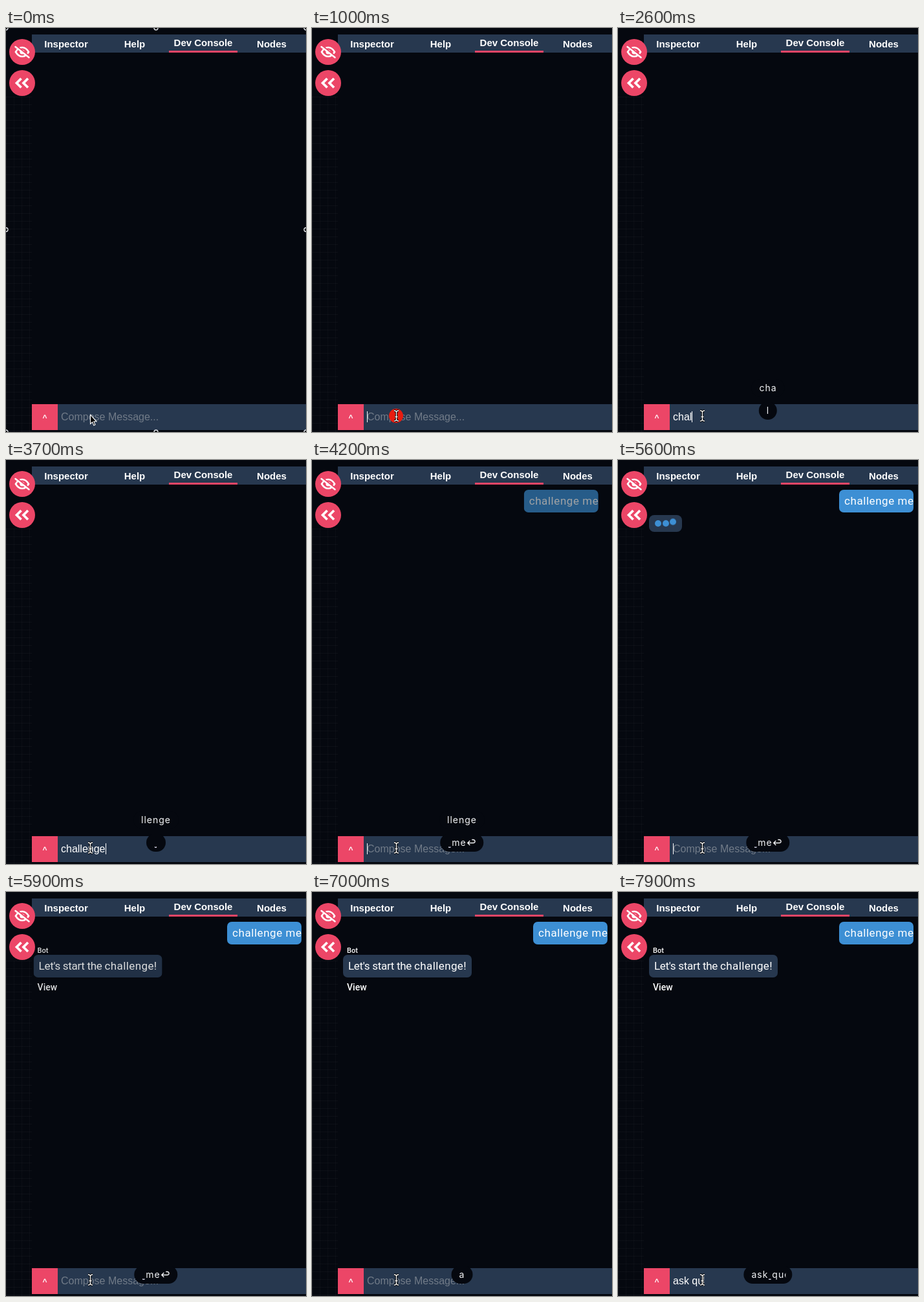
An HTML page for the animation above (8000 ms loop, 464 by 624 pixels).

```html
<!DOCTYPE html>
<html lang="en">
<head>
<meta charset="utf-8">
<title>Dev console chat</title>
<style>
  :root { --bg: #05080f; --bar: #27384f; --pink: #ec4667; --blue: #3d8fd4; }
  html, body { margin: 0; width: 100%; height: 100%; overflow: hidden; background: var(--bg); }
  #stage { position: relative; width: 464px; height: 624px; overflow: hidden; color: #fff; background: var(--bg); }
  #stage > * { position: absolute; white-space: pre; }
  .loop { animation: 8s linear infinite; }

  .grid {
    left: 0; top: 106px; width: 40px; height: 518px;
    background:
      repeating-linear-gradient(#ffffff08 0 1px, transparent 1px 12px),
      repeating-linear-gradient(90deg, #ffffff06 0 1px, transparent 1px 12px);
  }
  .tabs { left: 40px; top: 10px; width: 424px; height: 28px; background: var(--bar); display: flex; font: bold 15px/30px "Liberation Sans", Arial, sans-serif; }
  .tabs b { flex: 1; text-align: center; box-sizing: border-box; height: 28px; }
  .tabs .on { border-bottom: 3px solid var(--pink); line-height: 26px; }
  .icons { left: 0; top: 0; }

  .bubble { height: 35px; padding: 0 8px; border-radius: 7px; font: 17px/35px Roboto, sans-serif; box-sizing: border-box; }
  .user { left: 342px; top: 46px; width: 115px; background: var(--blue); letter-spacing: .56px; animation-name: user; }
  .bot { left: 48px; top: 84px; width: 199px; height: 80px; animation-name: bot; font: 500 14px/16px Roboto, sans-serif; }
  .bot > * { position: absolute; }
  .bot small { left: 6px; top: 0; font-size: 11px; line-height: 13px; }
  .bot .bubble { left: 0; top: 13px; width: 199px; background: var(--bar); letter-spacing: -.3px; }
  .bot .bubble span { letter-spacing: .4px; }
  .bot b { left: 6px; top: 55px; font-weight: 500; }
  .wait { left: 48px; top: 85px; width: 51px; height: 26px; border-radius: 8px; background: var(--bar); animation-name: wait; }
  .wait i { position: absolute; top: 8px; width: 10px; height: 10px; border-radius: 50%; background: var(--blue); animation-name: hop; }
  .wait i:nth-child(1) { left: 9px; }
  .wait i:nth-child(2) { left: 20.5px; animation-delay: .2s; }
  .wait i:nth-child(3) { left: 32px; animation-delay: .4s; }

  .field { left: 40px; top: 581px; width: 424px; height: 40px; background: var(--bar); font: 16px/40px "Liberation Sans", Arial, sans-serif; }
  .field > * { position: absolute; left: 45px; top: -.5px; }
  .field .send { left: 0; top: 0; width: 40px; height: 40px; background: var(--pink); text-align: center; font: bold 12px/42px "Liberation Sans", Arial, sans-serif; }
  #hint { color: #717b88; }
  #caret { display: inline-block; width: 1px; height: 17px; background: #fff; vertical-align: -3px; }

  .keys { left: 232px; height: 28px; border-radius: 14px; background: var(--bg); transform: translateX(-50%); font: 14px/28px Inter, sans-serif; letter-spacing: 1px; color: #f4f5f7; }
  .keys div { position: absolute; left: 12px; right: 10px; top: 0; height: 28px; overflow: hidden; }
  .keys span { display: inline-block; }
  .keys i { display: inline-block; width: 3px; height: 2px; margin: 0 2px 0 1px; border: solid #ccd; border-width: 0 1px 1px; box-sizing: border-box; vertical-align: -3px; }
  .keys svg { width: 14px; height: 12px; margin-left: 1px; vertical-align: -1px; }
  #now { top: 577px; }
  #past { top: 542px; }

  .dot { left: 119px; top: 588px; width: 22px; height: 22px; border-radius: 50%; background: #e81d10; animation-name: click; }
  .arrow { left: 129px; top: 596px; animation-name: arrow; }
  .beam { left: 124px; top: 589px; animation-name: beam; }
  .handles { left: 0; top: 0; animation-name: handles; }

  @keyframes user {
    0%, 50.25% { opacity: 0; transform: translateX(-38px); animation-timing-function: ease; }
    56.5%, 100% { opacity: 1; transform: none; }
  }
  @keyframes wait {
    0%, 55% { opacity: 0; transform: translateX(-38px); animation-timing-function: ease; }
    60.5% { opacity: 1; transform: none; animation-timing-function: step-end; }
    70.2%, 100% { opacity: 0; transform: none; }
  }
  @keyframes bot {
    0%, 70.25% { opacity: 0; transform: translateX(-38px); animation-timing-function: ease; }
    76.5%, 100% { opacity: 1; transform: none; }
  }
  @keyframes hop {
    0%, 58.75% { transform: none; animation-timing-function: ease; }
    63.6% { transform: translateY(-5px); animation-timing-function: ease; }
    68.5%, 100% { transform: none; }
  }
  @keyframes click {
    0% { opacity: 0; animation-timing-function: step-end; }
    10.9%, 13.5% { opacity: 1; transform: none; }
    17.3%, 100% { opacity: 0; transform: scale(1.9); }
  }
  @keyframes arrow { 0% { opacity: 1; animation-timing-function: step-end; } 8.7%, 100% { opacity: 0; } }
  @keyframes beam { 0% { opacity: 0; animation-timing-function: step-end; } 8.7%, 100% { opacity: 1; } }
  @keyframes handles {
    0% { opacity: 1; animation-timing-function: step-end; }
    1.2% { opacity: .4; animation-timing-function: step-end; }
    2.4%, 100% { opacity: 0; }
  }
</style>
</head>
<body>
<div id="stage">
  <div class="grid"></div>
  <div class="tabs"><b>Inspector</b><b>Help</b><b class="on">Dev Console</b><b>Nodes</b></div>

  <div class="bubble user loop">challenge me</div>
  <div class="wait loop"><i class="loop"></i><i class="loop"></i><i class="loop"></i></div>
  <div class="bot loop"><small>Bot</small><div class="bubble">Let's start the <span>challenge!</span></div><b>View</b></div>

  <svg class="icons" width="50" height="110" fill="none" stroke="#fff">
    <g fill="#ec4667" stroke="none"><circle cx="25" cy="37" r="20"/><circle cx="25" cy="85" r="20"/></g>
    <path d="M15 37Q19 30 25 30T35 37Q31 44 25 44T15 37Z" stroke-width="2.6"/>
    <circle cx="25" cy="37" r="3.6" fill="#fff" stroke="none"/>
    <path d="M15 27.5L37 44.5" stroke="#ec4667" stroke-width="3"/>
    <path d="M14.5 29L35.5 45.5" stroke-width="2.5" stroke-linecap="round"/>
    <path d="M23.5 78L16.5 85L23.5 92M34 78L27 85L34 92" stroke-width="3.8"/>
  </svg>

  <div class="field"><div class="send">^</div><span id="hint">Compose Message...</span><div><span id="typed"></span><span id="caret"></span></div></div>

  <div class="keys" id="past"><div><span></span></div></div>
  <div class="keys" id="now"><div><span></span></div></div>

  <div class="dot loop"></div>
  <svg class="arrow loop" width="14" height="20"><path d="M1.5 1.5V15.5L4.6 12.6L6.8 17.8L9 16.8L6.8 11.8H11Z" fill="#000" stroke="#fff" stroke-width="1.1"/></svg>
  <svg class="beam loop" width="13" height="20" fill="none">
    <path id="ibeam" d="M3 2Q6.5 2 6.5 5V15Q6.5 18 3 18M10 2Q6.5 2 6.5 5M6.5 15Q6.5 18 10 18M4.5 11.5H8.5" stroke="#000" stroke-width="3.2"/>
    <use href="#ibeam" style="stroke:#fff"/>
    <path d="M3 2Q6.5 2 6.5 5V15Q6.5 18 3 18M10 2Q6.5 2 6.5 5M6.5 15Q6.5 18 10 18M4.5 11.5H8.5" stroke="#fff" stroke-width="1.3"/>
  </svg>
  <svg class="handles loop" width="464" height="624" fill="#05080f" stroke="#e8eaee" stroke-width="1.3">
    <circle cx="232" cy="0" r="3"/><circle cx="0" cy="311.5" r="3"/><circle cx="464" cy="311.5" r="3"/><circle cx="232" cy="624" r="3"/>
    <circle cx="0" cy="0" r="3"/><circle cx="464" cy="0" r="3"/><circle cx="0" cy="624" r="3"/><circle cx="464" cy="624" r="3"/>
  </svg>
</div>
<script>
  const LOOP = 8000, BLINK = 530, GROW = 110, FOCUS = 870, SENT = 4050;
  const $ = id => document.getElementById(id);
  const [now, past, typed, hint, caret] = ['now', 'past', 'typed', 'hint', 'caret'].map($);

  // time, keys in the pill, text in the field, earlier keys above
  const steps = [
    [0, '', '', ''],
    [1780, 'c', '', ''], [1880, 'c', 'c', ''], [1980, 'ch', 'c', ''], [2080, 'cha', 'ch', ''],
    [2580, 'l', 'chal', 'cha'], [2780, 'll', 'chall', 'cha'], [2880, 'lle', 'chall', 'cha'],
    [2980, 'llen', 'challe', 'cha'], [3080, 'lleng', 'challen', 'cha'], [3180, 'llenge', 'challeng', 'cha'],
    [3680, ' ', 'challenge', 'llenge'], [3780, ' m', 'challenge ', 'llenge'], [3880, ' me', 'challenge m', 'llenge'],
    [3980, ' me\n', 'challenge me', 'llenge'], [SENT, ' me\n', '', 'llenge'], [5600, ' me\n', '', ''],
    [6980, 'a', '', ''], [7080, 'as', 'a', ''], [7180, 'ask', 'as', ''], [7380, 'ask ', 'ask', ''],
    [7570, 'ask q', 'ask ', ''], [7685, 'ask qu', 'ask q', ''], [7885, 'ask que', 'ask qu', '']
  ];

  const enter = '<svg viewBox="0 0 14 12" fill="none" stroke="#f4f5f7" stroke-width="1.3"><path d="M5 3L1.5 6.5L5 10M1.5 6.5H10Q12.8 6.5 12.8 4T10 1.5H8"/></svg>';
  const markup = keys => keys.replace(/ /g, '<i></i>').replace('\n', enter);

  const widths = {};
  function fill(pill, keys) {
    const span = pill.querySelector('span');
    if (pill.keys !== keys) {
      span.innerHTML = markup(keys);
      pill.keys = keys;
      pill.style.visibility = keys ? 'visible' : 'hidden';
    }
    return widths[keys] ??= span.getBoundingClientRect().width + 24;
  }
  steps.forEach(s => fill(now, s[1]));

  function draw(t) {
    const k = steps.findLastIndex(s => s[0] <= t);
    const [at, keys, text, old] = steps[k];
    const before = k ? steps[k - 1][1] : '';
    const full = fill(now, keys);
    const from = before && keys.startsWith(before) ? widths[before] : full;
    const p = Math.min(1, (t - at) / GROW);
    now.style.width = from + (full - from) * p * p * (3 - 2 * p) + 'px';

    past.style.width = fill(past, old) + 'px';
    past.style.opacity = t > 5300 ? Math.max(0, 1 - (t - 5300) / 300) : 1;

    typed.textContent = text;
    hint.style.visibility = text ? 'hidden' : 'visible';
    const since = t - (t < SENT ? FOCUS : SENT);
    const lit = text || (since >= 0 && Math.floor(since / BLINK) % 2 === 0);
    caret.style.visibility = lit ? 'visible' : 'hidden';
  }

  let start;
  function tick(ms) {
    start ??= ms;
    draw((ms - start) % LOOP);
    requestAnimationFrame(tick);
  }
  draw(0);
  requestAnimationFrame(tick);
</script>
</body>
</html>
```
